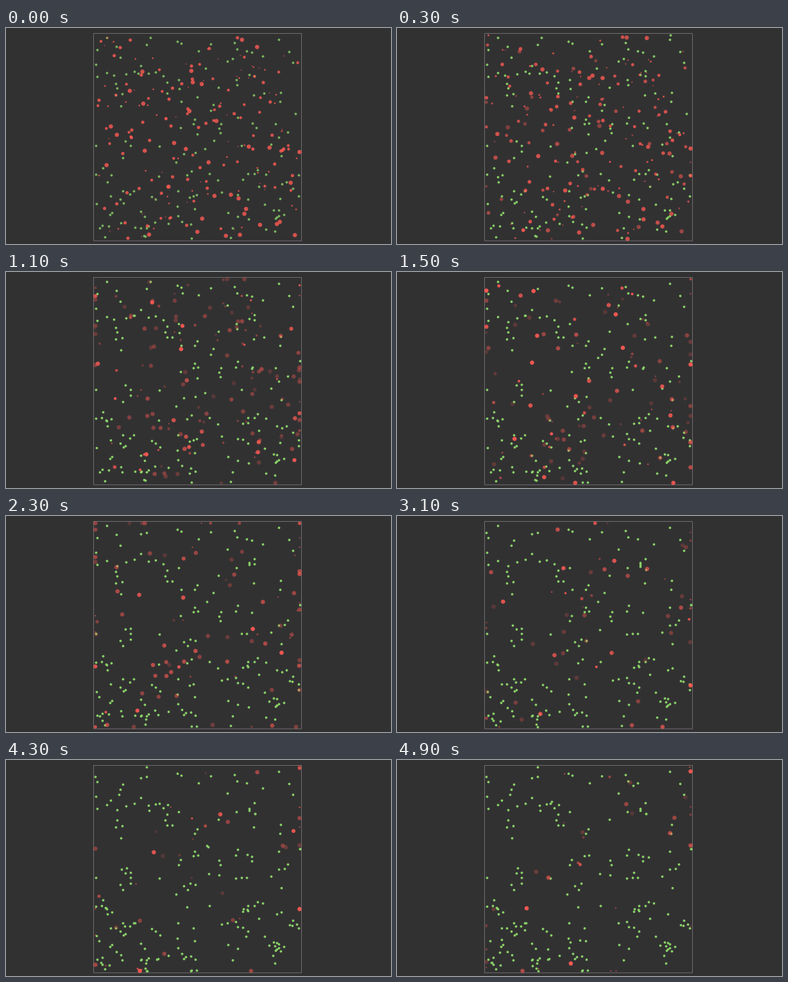
A matplotlib script for the animation above (5000 ms loop, 600x338 px).

```python
import numpy as np
import matplotlib.pyplot as plt
from matplotlib.animation import FuncAnimation
from matplotlib.colors import to_rgb
from matplotlib.patches import Rectangle

W, H, DPI = 600, 338, 100
FRAMES, INTERVAL = 50, 100
BG, RED, GREEN, EDGE = "#323132", "#ff5b54", "#88d067", "#716e70"
LOW, HIGH = np.array([139.3, 11.3]), np.array([457.5, 330.0])

FOOD_START, FOOD_SPROUTS, FOOD_RADIUS = 155, 105, 1.9
HUNTERS_START, HUNTERS_BORN, HUNTER_RADIUS = 195, 60, 3.3

rng = np.random.default_rng(12)


def scattered(count):
    return rng.uniform(LOW, HIGH, (count, 2))


def direction(angle):
    return np.column_stack([np.cos(angle), np.sin(angle)])


def births(start, later):
    """The starting population exists at once, the rest arrive one by one."""
    return np.concatenate([np.zeros(start), rng.integers(1, FRAMES, later)])


def grow_food():
    """Fixed dots; new ones sprout right beside an older dot."""
    first = scattered(FOOD_START)
    parents = first[rng.integers(0, FOOD_START, FOOD_SPROUTS)]
    offset = 8.5 * direction(rng.uniform(0, 2 * np.pi, FOOD_SPROUTS))
    pos = np.clip(np.vstack([first, parents + offset]), LOW, HIGH)
    life = rng.uniform(6, 150, len(pos))
    return pos, births(FOOD_START, FOOD_SPROUTS), life


def wander(count):
    """Paths with slowly turning headings, held inside the walls."""
    heading = rng.uniform(0, 2 * np.pi, count)
    speed = rng.uniform(3, 6.5, (count, 1))
    path = [scattered(count)]
    for _ in range(FRAMES - 1):
        heading += rng.normal(0, 0.3, count)
        path.append(np.clip(path[-1] + speed * direction(heading), LOW, HIGH))
    return np.array(path)


def marker_size(radius):
    return (2 * radius * 72 / DPI) ** 2


food_pos, food_born, food_life = grow_food()

# A hunter fades until each meal and starves after its last one.
count = HUNTERS_START + HUNTERS_BORN
paths = wander(count)
born = births(HUNTERS_START, HUNTERS_BORN)
hunger = rng.uniform(4, 17, count)
life = hunger * rng.geometric(0.5, count)
birth_radius = np.where(born > 0, 0.8, rng.choice([0.8, 1.3, 2.2, 2.6, 3.3], count))

fig = plt.figure(figsize=(W / DPI, H / DPI), dpi=DPI, facecolor=BG)
ax = fig.add_axes([0, 0, 1, 1])
ax.set(xlim=(0, W), ylim=(H, 0))
ax.axis("off")
ax.add_patch(Rectangle((136.5, 8.5), 324, 324.5, fill=False, ec=EDGE,
                       lw=72 / DPI, snap=False))

food = ax.scatter([], [], c=GREEN, s=marker_size(FOOD_RADIUS), lw=0, zorder=2)
hunters = ax.scatter([], [], c=RED, lw=0, zorder=3)


def draw(frame):
    fade_in = min(1, 0.82 + 0.05 * frame)

    age = frame - food_born
    food.set_offsets(food_pos[(age >= 0) & (age < food_life)])
    food.set_alpha(fade_in)

    age = frame - born
    alive = (age >= 0) & (age < life)
    energy = 0.97 - 0.8 * (age / hunger % 1)
    radius = np.minimum(HUNTER_RADIUS, birth_radius + 0.08 * age)
    hunters.set_offsets(paths[frame][alive])
    hunters.set_sizes(marker_size(radius[alive]))
    hunters.set_facecolors([(*to_rgb(RED), a) for a in fade_in * energy[alive]])
    return food, hunters


anim = FuncAnimation(fig, draw, frames=FRAMES, interval=INTERVAL, repeat=True,
                     repeat_delay=0, init_func=lambda: draw(0))
plt.show()
```
